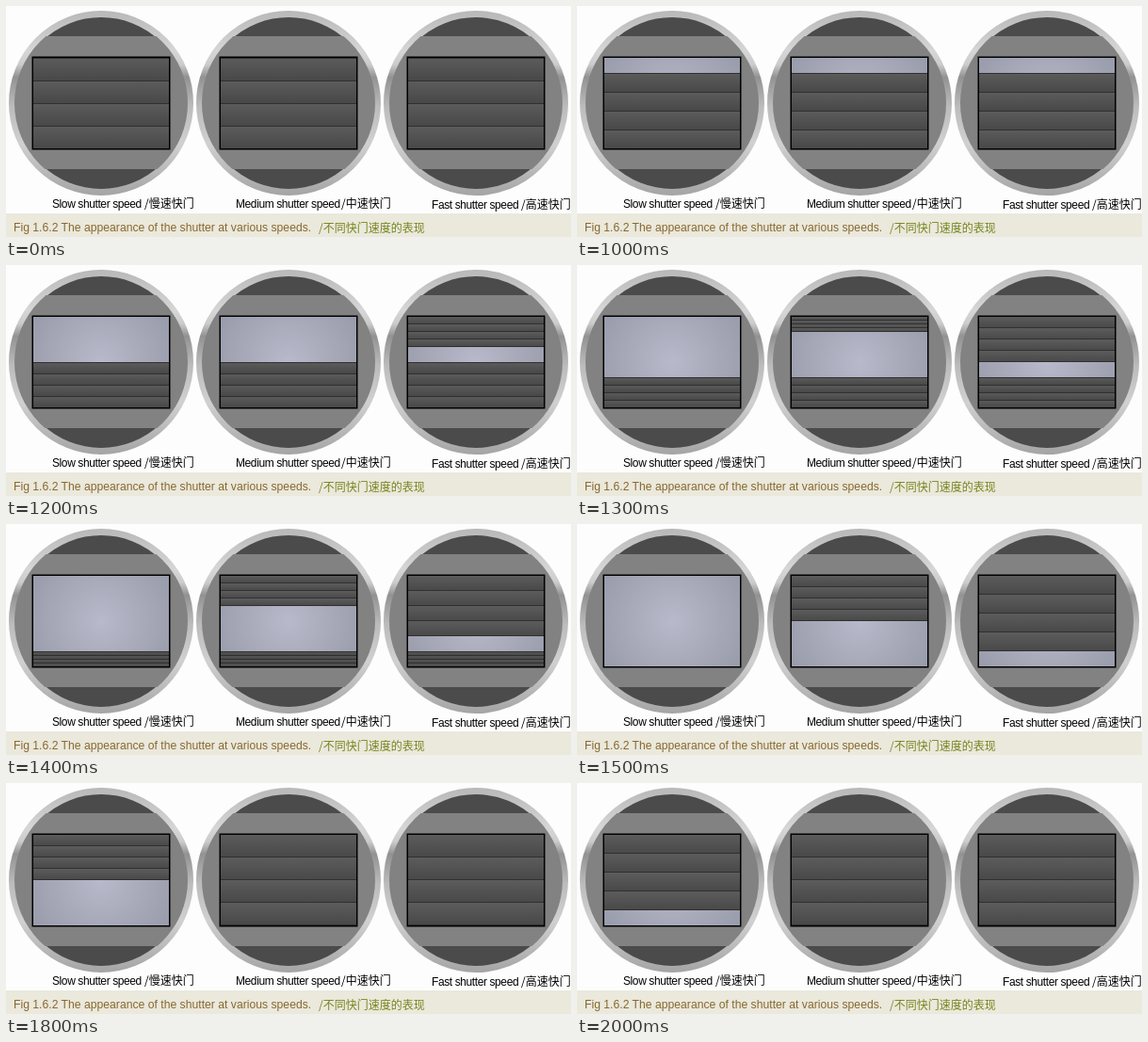
These frames come from a looping animation (600 px wide and 245 px high, 2100 ms). An HTML page:

```html
<!DOCTYPE html>
<html lang="en">
<head>
<meta charset="utf-8">
<title>Shutter speeds</title>
<style>
  html, body { margin: 0; width: 100%; height: 100%; overflow: hidden; background: #fdfdfd; }
  svg { display: block; }
  text { font: 12px "Liberation Sans", Arial, sans-serif; white-space: pre; }
  .label { letter-spacing: -.4px; }
  .cjk { font-family: "Noto Sans CJK SC", "Noto Sans CJK", sans-serif; }
  .caption { font-size: 12.2px; fill: #87692f; }
  .note { fill: #75851c; }
</style>
</head>
<body>
<svg id="stage" width="600" height="245" viewBox="0 0 600 245">
  <defs>
    <linearGradient id="ring" gradientUnits="userSpaceOnUse" x1="0" y1="5" x2="0" y2="201">
      <stop offset="0" stop-color="#b8b8b8"/>
      <stop offset=".22" stop-color="#d6d6d6"/>
      <stop offset=".29" stop-color="#cccccc"/>
      <stop offset=".36" stop-color="#929292"/>
      <stop offset=".52" stop-color="#bcbcbc"/>
      <stop offset=".72" stop-color="#d0d0d0"/>
      <stop offset="1" stop-color="#a4a4a4"/>
    </linearGradient>
    <radialGradient id="sensor" gradientUnits="userSpaceOnUse" cx="101" cy="103" r="88">
      <stop offset="0" stop-color="#b8b9ca"/>
      <stop offset="1" stop-color="#989baa"/>
    </radialGradient>
    <linearGradient id="slat" x1="0" y1="0" x2="0" y2="1">
      <stop offset="0" stop-color="#5c5c5c"/>
      <stop offset="1" stop-color="#484848"/>
    </linearGradient>
    <clipPath id="lens"><circle cx="101" cy="103" r="92"/></clipPath>
    <g id="body">
      <circle cx="101" cy="103" r="94.5" fill="#4b4b4b" stroke="url(#ring)" stroke-width="7"/>
      <rect x="9" y="32" width="184" height="141" fill="#828282" clip-path="url(#lens)"/>
      <rect x="27.5" y="53.5" width="147" height="99"/>
      <rect x="29" y="55" width="144" height="96" fill="url(#sensor)"/>
    </g>
  </defs>
  <rect width="600" height="245" fill="#fdfdfd"/>
  <g id="cameras"></g>
  <rect y="220" width="600" height="25" fill="#ebe8dc"/>
  <text class="caption" x="8" y="239">Fig 1.6.2 The appearance of the shutter at various speeds.</text>
  <text class="cjk note" x="332" y="239.5">/不同快门速度的表现</text>
</svg>
<script>
const TOP = 55, BOTTOM = 151, TRAVEL = 16, SLATS = 4;
const HOLD = 1000, STEP = 100, LOOP = 2100;

// delay: step after which the closing curtain starts to fall
const cameras = [
  { delay: 6, name: "Slow shutter speed", note: "/慢速快门", x: 49, noteX: 147, y: 214 },
  { delay: 3, name: "Medium shutter speed", note: "/中速快门", x: 244, noteX: 356, y: 214 },
  { delay: 1, name: "Fast shutter speed", note: "/高速快门", x: 452, noteX: 547, y: 215 }
];

function add(parent, tag, attrs, content = "") {
  const node = document.createElementNS("http://www.w3.org/2000/svg", tag);
  for (const key in attrs) node.setAttribute(key, attrs[key]);
  node.textContent = content;
  return parent.appendChild(node);
}

function makeCurtain(parent) {
  return Array.from({ length: SLATS }, () => ({
    panel: add(parent, "rect", { x: 29, width: 144, fill: "url(#slat)" }),
    edge: add(parent, "rect", { x: 29, width: 144, fill: "#303030" })
  }));
}

function placeCurtain(slats, from, to, edgeAtBottom) {
  const height = (to - from) / SLATS;
  slats.forEach(({ panel, edge }, i) => {
    const y = from + i * height;
    panel.setAttribute("y", y);
    panel.setAttribute("height", height);
    edge.setAttribute("y", edgeAtBottom ? y + height - 1 : y);
    edge.setAttribute("height", height > 0 ? 1 : 0);
  });
}

const root = document.getElementById("cameras");
cameras.forEach((cam, i) => {
  const group = add(root, "g", { transform: `translate(${199 * i} 0)` });
  add(group, "use", { href: "#body" });
  cam.opening = makeCurtain(group);
  cam.closing = makeCurtain(group);
  add(root, "text", { class: "label", x: cam.x, y: cam.y }, cam.name);
  add(root, "text", { class: "cjk", x: cam.noteX, y: cam.y }, cam.note);
});

const fall = steps => Math.min(BOTTOM, TOP + TRAVEL * Math.max(0, steps));

let shown = -1;
function draw(now) {
  const time = now % LOOP;
  const step = time < HOLD ? 0 : 1 + Math.floor((time - HOLD) / STEP);
  if (step !== shown) {
    shown = step;
    for (const cam of cameras) {
      placeCurtain(cam.opening, fall(step), BOTTOM, false);
      placeCurtain(cam.closing, TOP, fall(step - cam.delay), true);
    }
  }
}

const start = performance.now();
function tick() {
  draw(performance.now() - start);
  requestAnimationFrame(tick);
}
tick();
</script>
</body>
</html>
```
